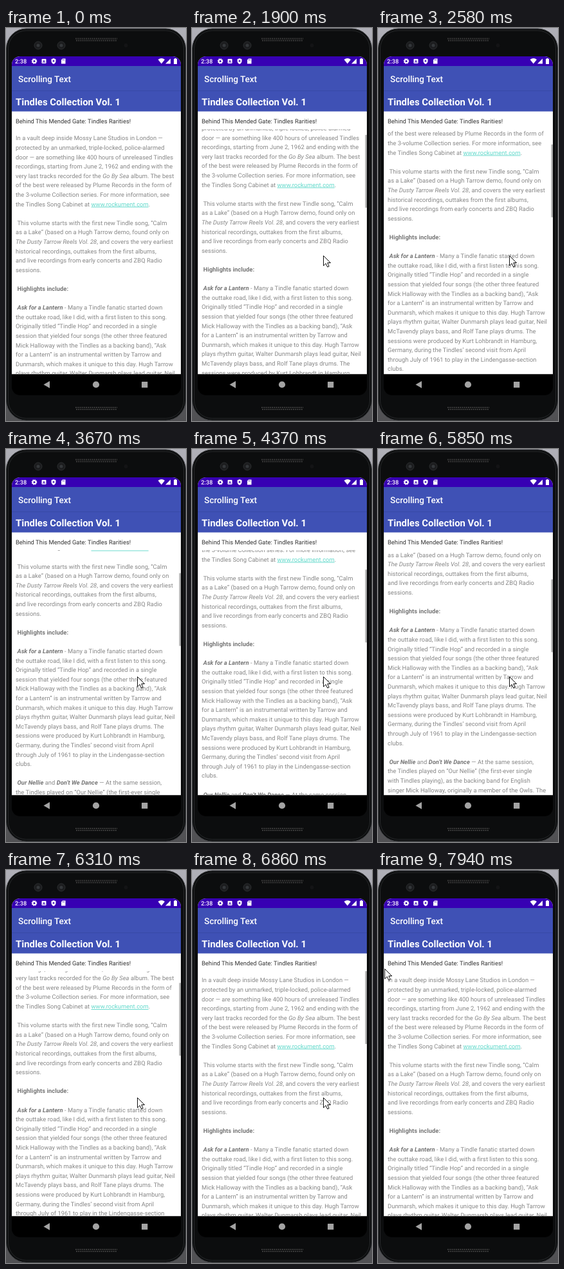
These frames come from a looping animation (280x610 px, 8 s). An HTML page:

```html
<!DOCTYPE html>
<html lang="en">
<head>
<meta charset="utf-8">
<title>Scrolling Text</title>
<style>
  html, body { margin: 0; width: 100%; height: 100%; overflow: hidden; background: linear-gradient(#b0b0b8, #505053); }
  svg { display: block; }
  text { font-family: Roboto, sans-serif; white-space: pre; text-rendering: geometricPrecision; }
  #body text, .sub { font-size: 9.37px; letter-spacing: .04px; }
  #body { fill: #868686; }
  .b { font-weight: 700; fill: #777; }
  .i { font-style: italic; }
  .a { fill: #62d9cb; text-decoration: underline; }
</style>
</head>
<body>
<svg width="280" height="610" viewBox="0 0 280 610">
  <defs>
    <clipPath id="view"><rect x="9" y="157" width="263" height="380.500"/></clipPath>
    <clipPath id="screen"><rect x="9" y="44" width="263" height="526" rx="13"/></clipPath>
  </defs>

  <!-- Phone -->
  <rect x=".5" y="1" width="279" height="608" rx="31" fill="#0c0d0e" stroke="#3d3f42"/>
  <rect x="3.500" y="4" width="273" height="602" rx="28" fill="none" stroke="#26282a"/>
  <path d="M108 16.500H173M109 19.500H172M108 589H173M109 592H172" stroke="#3b3b3b" stroke-width="2" stroke-dasharray="2 1.200"/>
  <g fill="#1c1d1f" stroke="#2c2e30">
    <circle cx="50" cy="27" r="6"/><circle cx="86" cy="27" r="6"/>
  </g>
  <g fill="#34373a"><circle cx="50" cy="27" r="2.500"/><circle cx="86" cy="27" r="2.500"/></g>
  <circle cx="186.500" cy="27" r="3" fill="#141416"/>

  <!-- Screen -->
  <g clip-path="url(#screen)">
    <rect x="9" y="44" width="263" height="493.500" fill="#fff"/>
    <rect x="9" y="44" width="263" height="15" fill="#3700b3"/>
    <rect x="9" y="59" width="263" height="70.500" fill="#3f51b5"/>
    <path d="M9 97.500H272" stroke="#384aa6"/>
    <rect x="9" y="537.500" width="263" height="32.500" fill="#000"/>
  </g>
  <g fill="#fff">
    <text x="14" y="54.800" font-size="9.2" font-weight="500">2:38</text>
    <circle cx="44" cy="51.500" r="2.500" fill="none" stroke="#fff" stroke-width="2"/>
    <circle cx="44" cy="51.500" r="3.700" fill="none" stroke="#fff" stroke-width="1.300" stroke-dasharray="1.450"/>
    <rect x="55.500" y="48" width="7" height="7" rx="1"/>
    <text x="59" y="54" font-size="6" font-weight="700" text-anchor="middle" style="fill:#3700b3">A</text>
    <path d="M74 47L77.500 48.500V51Q77.500 54.500 74 56Q70.500 54.500 70.500 51V48.500Z"/>
    <circle cx="74" cy="51.300" r="1.300" fill="#3700b3"/>
    <path d="M88 47.500H92.500V55.500H86V49.500Z"/>
    <path d="M88.500 48.500V50.500M90.300 48.500V50.500" stroke="#3700b3" stroke-width=".7"/>
    <path d="M236.500 49Q242 45 247 49L241.800 55.500ZM248 55.500L256 47.500V55.500Z"/>
    <path d="M261 48H262.200V47H264.800V48H266V56H261Z"/>
    <text x="19" y="83.500" font-size="13.500" font-weight="500">Scrolling Text</text>
    <text x="15" y="119.800" font-size="14.900" font-weight="700">Tindles Collection Vol. 1</text>
  </g>
  <text class="sub" x="15" y="147.500" fill="#333">Behind This Mended Gate: Tindles Rarities!</text>
  <g clip-path="url(#view)"><g id="body"></g></g>
  <rect id="bar" x="269.300" y="157" width="2.700" height="113" fill="#000" fill-opacity=".3"/>
  <g fill="#a3a3a3">
    <path d="M58.500 553.500L68 548V559Z"/>
    <circle cx="140" cy="553.500" r="5.100"/>
    <rect x="211" y="549" width="9.300" height="9.300" rx=".5"/>
  </g>

  <path id="cursor" d="M.5 .5V16L4.200 12.500L6.700 18L9.200 17L6.800 11.500H11.500Z" fill="#fff" stroke="#111"/>
</svg>
<script>
const $ = id => document.getElementById(id);

// *bold*, _italic_, ~bold italic~, [link]
const copy = `In a vault deep inside Mossy Lane Studios in London —
protected by an unmarked, triple-locked, police-alarmed
door — are something like 400 hours of unreleased Tindles
recordings, starting from June 2, 1962 and ending with the
very last tracks recorded for the _Go By Sea_ album. The best
of the best were released by Plume Records in the form of
the 3-volume Collection series. For more information, see
the Tindles Song Cabinet at [www.rockument.com].

 This volume starts with the first new Tindle song, “Calm
as a Lake” (based on a Hugh Tarrow demo, found only on
_The Dusty Tarrow Reels Vol. 28_, and covers the very earliest
historical recordings, outtakes from the first albums,
and live recordings from early concerts and ZBQ Radio
sessions.

 *Highlights include:*

 ~Ask for a Lantern~ - Many a Tindle fanatic started down
the outtake road, like I did, with a first listen to this song.
Originally titled “Tindle Hop” and recorded in a single
session that yielded four songs (the other three featured
Mick Halloway with the Tindles as a backing band), “Ask
for a Lantern” is an instrumental written by Tarrow and
Dunmarsh, which makes it unique to this day. Hugh Tarrow
plays rhythm guitar, Walter Dunmarsh plays lead guitar, Neil
McTavendy plays bass, and Rolf Tane plays drums. The
sessions were produced by Kurt Lohbrandt in Hamburg,
Germany, during the Tindles’ second visit from April
through July of 1961 to play in the Lindengasse-section
clubs.

 ~Our Nellie~ and ~Don’t We Dance~ — At the same session,
the Tindles played on “Our Nellie” (the first-ever single
with Tindles playing), as the backing band for English
singer Mick Halloway, originally a member of the Owls. The
popularity of this single in Liverpool brought the Tindles
to the attention of Clive Wexford, who worked in the TORV
record store and tried to meet demand for the disc. Hugh
Tarrow then sings a fine “Don’t We Dance” (his first-ever`;

const span = cls => `<tspan class="${cls}">$1</tspan>`;
const markup = line => line
  .replace(/\[(.+?)\]/g, span('a'))
  .replace(/\*(.+?)\*/g, span('b'))
  .replace(/_(.+?)_/g, span('i'))
  .replace(/~(.+?)~/g, span('b i'));
$('body').innerHTML = copy.split('\n').map((line, n) =>
  `<text x="${line[0] === ' ' ? 17.5 : 15}" y="${174.3 + n * 14.6}">${markup(line.trim())}</text>`).join('');

// Each move: first step, last step, number of steps, value reached
const scrollMoves = [
  [1420, 1420, 1, 8], [1650, 1900, 4, 30], [2350, 2580, 4, 80], [3050, 3210, 3, 130.7],
  [3670, 3900, 4, 88], [4370, 4450, 2, 116], [4600, 4600, 1, 128], [4920, 5000, 2, 171],
  [5150, 5230, 2, 213.5], [5610, 6400, 11, 46.3], [6480, 6860, 6, 0]
];

function stepped(t, moves) {
  let value = 0;
  for (const [start, end, count, to] of moves) {
    if (t < start) break;
    const gap = (end - start) / (count - 1) || 1;
    const step = Math.min(count, Math.floor((t - start + 12) / gap) + 1);
    value += (to - value) * step / count;
  }
  return value;
}

const mix = (a, b, p) => a + (b - a) * p;
const curve = (a, c, b, p) => mix(mix(a, c, p), mix(c, b, p), p);

function cursorAt(t) {
  if (t < 7020) {
    const p = stepped(t, [[330, 880, 8, 1]]);
    return [curve(280, 140, 204, p), curve(615, 410, 353, p)];
  }
  if (t < 7860) {
    const p = stepped(t, [[7020, 7790, 11, 1]]);
    return [mix(204, 0, p), mix(353, 157, p)];
  }
  const p = stepped(t, [[7860, 7940, 2, 1]]);
  return [mix(0, 10, p), mix(157, 153, p)];
}

function draw(now) {
  const t = now % 8000;
  const y = stepped(t, scrollMoves);
  $('body').setAttribute('transform', `translate(0 ${-y})`);
  $('bar').setAttribute('y', 157 + y * .297);
  $('bar').setAttribute('opacity', t < 1420 ? 0 : Math.max(0, Math.min(1, (7300 - t) / 280)));
  $('cursor').setAttribute('transform', `translate(${cursorAt(t)})`);
  $('cursor').setAttribute('visibility', t < 330 ? 'hidden' : 'visible');
}

const begin = performance.now();
(function tick() {
  draw(performance.now() - begin);
  requestAnimationFrame(tick);
})();
</script>
</body>
</html>
```
